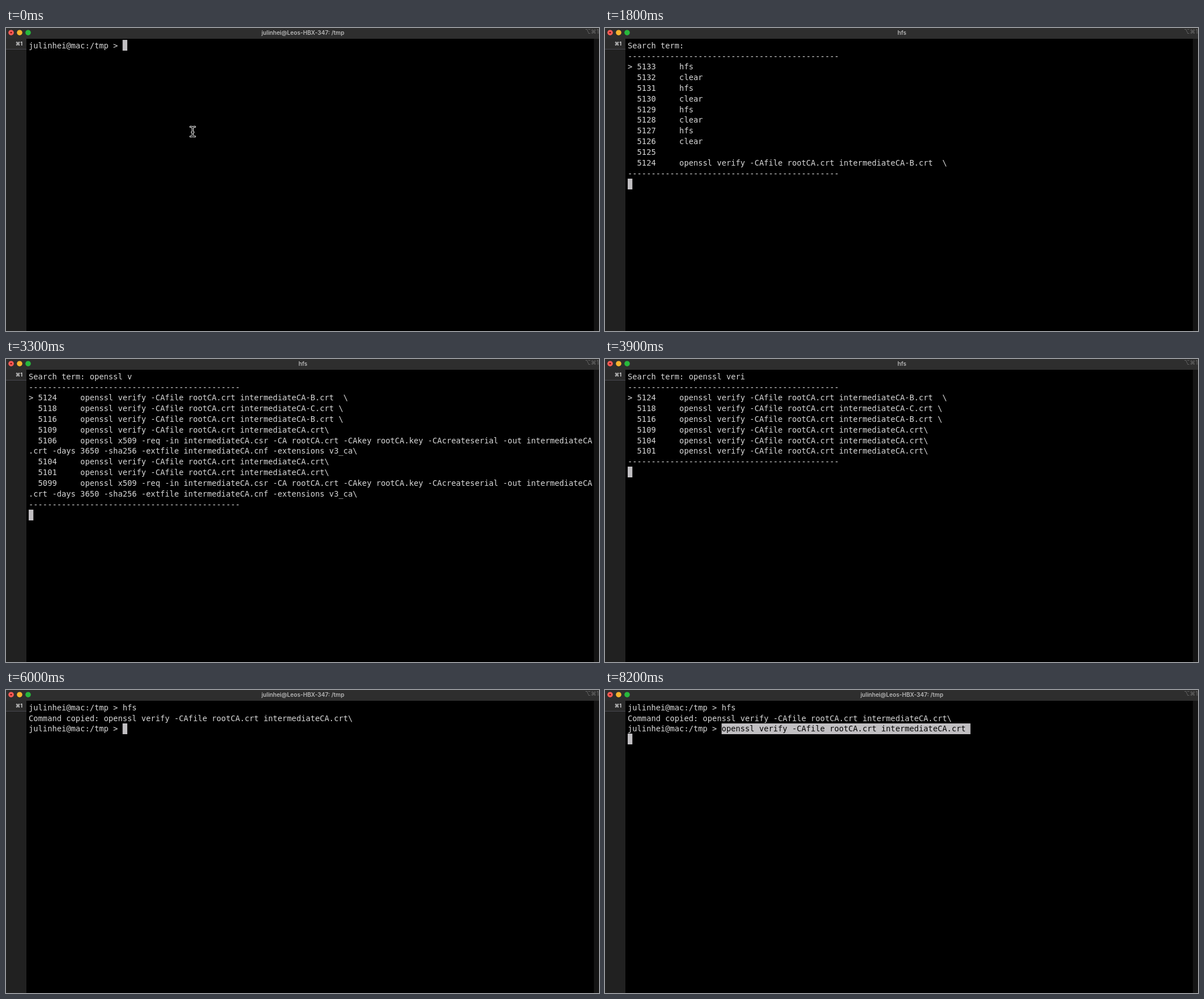
An HTML page with a canvas that plays this animation: 1046 by 535 pixels, repeating every 8.3 s.

```html
<!DOCTYPE html>
<html lang="en">
<head>
<meta charset="utf-8">
<title>Terminal history search</title>
<style>
  html, body { margin: 0; width: 100%; height: 100%; overflow: hidden; background: #000; }
  canvas { display: block; width: 1046px; height: 535px; }
</style>
</head>
<body>
<canvas id="stage" width="1046" height="535"></canvas>
<script>
const ctx = document.getElementById('stage').getContext('2d');
const LOOP = 8300;
const COLS = 120, CELL = 8.283, ROW = 18.81, LEFT = 40, TOP = 21, BASE = 14.8;
const MONO = '13.76px "DejaVu Sans Mono", "Noto Sans Mono", monospace';
const UI = 'Inter, Roboto, "DejaVu Sans", sans-serif';
const FG = '#d8d8d8', BLOCK = '#c1bfc2';

const PROMPT = 'julinhei@mac:/tmp > ';
const HOST = 'julinhei@Leos-HBX-347: /tmp';
const RULE = '-'.repeat(45);
const VERIFY = 'openssl verify -CAfile rootCA.crt intermediateCA';
const SIGN = 'openssl x509 -req -in intermediateCA.csr -CA rootCA.crt -CAkey rootCA.key ' +
  '-CAcreateserial -out intermediateCA.crt -days 3650 -sha256 -extfile intermediateCA.cnf -extensions v3_ca\\';

const recent = [5133, 5132, 5131, 5130, 5129, 5128, 5127, 5126]
  .map(n => [n, n % 2 ? 'hfs' : 'clear'])
  .concat([[5125, ''], [5124, VERIFY + '-B.crt  \\']]);
const matches = [
  [5124, VERIFY + '-B.crt  \\'],
  [5118, VERIFY + '-C.crt \\'],
  [5116, VERIFY + '-B.crt \\'],
  [5109, VERIFY + '.crt\\'],
  [5106, SIGN],
  [5104, VERIFY + '.crt\\'],
  [5101, VERIFY + '.crt\\'],
  [5099, SIGN],
  [5091, 'openssl req -new -key intermediateCA.key -out intermediateCA.csr -subj ' +
    '"/C=US/ST=State/L=City/O=Organization/OU=OrgUnit/CN=IntermediateCA"\\'],
  [5089, 'openssl genpkey -algorithm RSA -out intermediateCA.key -aes256']
];

// Times at which each key lands
const COMMAND = [200, 500, 600];
const QUERY = [2000, 2100, 2200, 2300, 2400, 2500, 2600, 2900, 3200, 3400, 3500, 3600];
const DOWN = [4400, 4500, 4600];
const ENTER = 1000, LIST = 1100, PICK = 5300, READY = 5400, PASTE = 6200;

const count = (times, t) => times.filter(x => t >= x).length;

function search(query) {
  if (!query) return recent;
  const words = query.trim().split(' ');
  return matches.filter(m => words.every(w => m[1].includes(w)));
}

function wrap(line) {
  const out = [];
  for (let i = 0; i < line.length; i += COLS) out.push(line.slice(i, i + COLS));
  return out;
}

function picker(t) {
  const query = 'openssl veri'.slice(0, count(QUERY, t));
  const picked = count(DOWN, t);
  const lines = ['Search term: ' + query, RULE];
  search(query).forEach(([id, cmd], i) => {
    lines.push(...wrap((i === picked ? '> ' : '  ') + id + '     ' + cmd));
  });
  lines.push(RULE);
  return { title: 'hfs', lines, cursor: [0, lines.length] };
}

function shell(t) {
  const typed = 'hfs'.slice(0, count(COMMAND, t));
  const lines = [PROMPT + typed];
  if (t < ENTER) return { title: HOST, lines, cursor: [lines[0].length, 0] };
  if (t < LIST) return { title: 'hfs', lines, cursor: [0, 1] };
  lines.push('Command copied: ' + VERIFY + '.crt\\');
  if (t < READY) return { title: HOST, lines, cursor: [0, 2] };
  lines.push(PROMPT);
  if (t < PASTE) return { title: HOST, lines, cursor: [PROMPT.length, 2] };
  return { title: HOST, lines, cursor: [0, 3], pasted: VERIFY + '.crt ' };
}

function rect(x, y, w, h, color) {
  ctx.fillStyle = color;
  ctx.fillRect(x, y, w, h);
}

function dot(x, y, r, color) {
  ctx.fillStyle = color;
  ctx.beginPath();
  ctx.arc(x, y, r, 0, Math.PI * 2);
  ctx.fill();
}

function label(text, x, y, font, color, align) {
  ctx.font = font;
  ctx.fillStyle = color;
  ctx.textAlign = align;
  ctx.fillText(text, x, y);
}

function block(col, row, n) {
  rect(LEFT + col * CELL, Math.round(TOP + row * ROW), n * CELL, 19, BLOCK);
}

function print(text, col, row, color) {
  ctx.font = MONO;
  ctx.fillStyle = color;
  ctx.textAlign = 'left';
  const y = Math.round(TOP + row * ROW + BASE);
  [...text].forEach((ch, i) => {
    if (ch !== ' ') ctx.fillText(ch, LEFT + (col + i) * CELL, y);
  });
}

function frame(title) {
  rect(0, 0, 1046, 535, '#000');
  rect(0, 19, 36, 516, '#212121');
  rect(1037, 19, 9, 516, '#151515');
  rect(0, 0, 1046, 19, '#2e2e2e');
  rect(0, 19, 36, 18, '#2b2b2b');
  rect(0, 37, 36, 1, '#494950');
  dot(9, 8.2, 4.8, '#fc5b55');
  dot(9, 8.2, 1.4, '#7a0c0a');
  dot(24, 8.2, 4.8, '#f6b42e');
  dot(39, 8.2, 4.8, '#28b83c');
  label(title, 523.7, 11.5, '600 10.1px ' + UI, '#b7b7b7', 'center');
  label('⌥⌘1', 1045.5, 10, '10px ' + UI, '#6c6c6c', 'right');
  label('⌘1', 29, 31, 'bold 8.8px ' + UI, '#dedede', 'right');
}

function ibeam(x, y) {
  const path = new Path2D();
  for (const s of [-1, 1]) {
    path.moveTo(x - 4, y + s * 8.6);
    path.quadraticCurveTo(x - 0.5, y + s * 8.6, x, y + s * 7);
    path.quadraticCurveTo(x + 0.5, y + s * 8.6, x + 4, y + s * 8.6);
  }
  path.moveTo(x, y - 7);
  path.lineTo(x, y + 7);
  path.moveTo(x - 1.5, y + 1);
  path.lineTo(x + 1.5, y + 1);
  ctx.lineCap = 'round';
  ctx.lineJoin = 'round';
  for (const [width, color] of [[3.4, '#f2f2f2'], [1.3, '#000']]) {
    ctx.lineWidth = width;
    ctx.strokeStyle = color;
    ctx.stroke(path);
  }
}

function draw(t) {
  const view = t >= LIST && t < PICK ? picker(t) : shell(t);
  frame(view.title);
  view.lines.forEach((line, row) => print(line, 0, row, FG));
  if (view.pasted) {
    block(PROMPT.length, 2, view.pasted.length);
    print(view.pasted, PROMPT.length, 2, '#000');
  }
  block(...view.cursor, 1);
  if (t < COMMAND[0]) ibeam(329.3, 183);
}

const start = performance.now();
function tick() {
  draw((performance.now() - start) % LOOP);
  requestAnimationFrame(tick);
}
tick();
</script>
</body>
</html>
```
